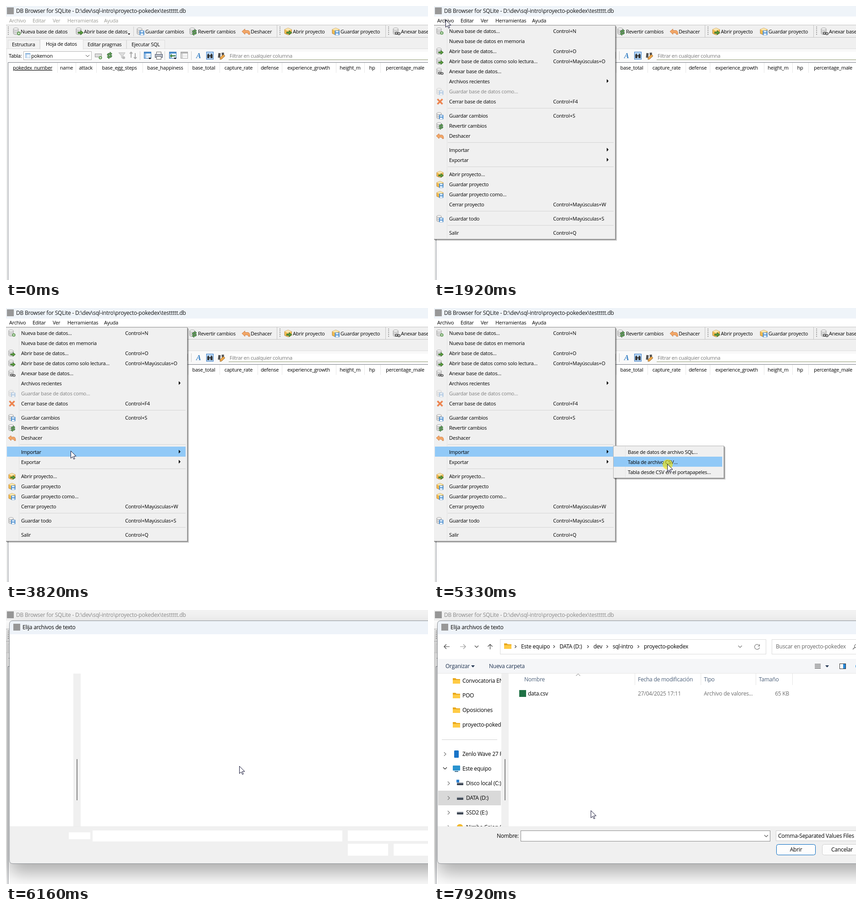
Animation of 921x599 px, one loop 7.99 s. Source, as an HTML page:

```html
<!DOCTYPE html>
<html lang="es">
<head>
<meta charset="utf-8">
<style>
html, body { margin: 0; width: 100%; height: 100%; overflow: hidden; background: #fff; }
svg { display: block; }
text { font: 11px "Open Sans", "Noto Sans", sans-serif; letter-spacing: -.25px; white-space: pre; }
.big text { font-size: 12px; letter-spacing: -.23px; }
.mid { text-anchor: middle; }
</style>
</head>
<body>
<svg id="stage" width="921" height="599" viewBox="0 0 921 599"></svg>
<script>
const LOOP = 7990, stage = document.getElementById('stage');

const rect = (x, y, w, h, fill, more = '') =>
  `<rect x="${x}" y="${y}" width="${w}" height="${h}" fill="${fill}" ${more}/>`;
const box = (x, y, w, h, fill, stroke, r = 0) =>
  rect(x + .5, y + .5, w - 1, h - 1, fill, `stroke="${stroke}" rx="${r}"`);
const line = (d, color, w = 1, more = '') =>
  `<path d="${d}" fill="none" stroke="${color}" stroke-width="${w}" ${more}/>`;
const shape = (d, fill, stroke = 'none') =>
  `<path d="${d}" fill="${fill}" stroke="${stroke}" stroke-width=".8"/>`;
// y is the visual middle of the capitals
const text = (x, y, s, fill = '#000', more = '') =>
  `<text x="${x}" y="${y + 4}" fill="${fill}" ${more}>${s}</text>`;
const group = (id, body, more = '') => `<g id="${id}" ${more}>${body}</g>`;

const bend = shape('M3 8Q2 3 9 3V.500l4.500 4L9 8.500V6Q5.500 6 5.500 8z', '#5c9c50', '#2c5c33');
const parts = {
  db: shape('M1 3v9a5 2.2 0 0 0 10 0V3', '#dedede', '#8c8c8c') +
    '<ellipse cx="6" cy="3" rx="5" ry="2.2" fill="#f8f8f8" stroke="#8c8c8c" stroke-width=".8"/>' +
    line('M1 7.5a5 2.2 0 0 0 10 0', '#a8a8a8', .8),
  plus: '<circle cx="12" cy="12" r="3.6" fill="#5d9a50"/>' + line('M10 12h4M12 10v4', '#fff', 1.2),
  go: shape('M5 9h5V6l5.500 4.500-5.500 4.500v-3H5z', '#5a9c3c', '#27591f'),
  disk: rect(6, 6, 9.500, 9.500, '#4c8fd0', 'rx="1"') + rect(8, 7, 5.500, 3, '#e8f2fc') + rect(8, 12, 5.500, 3, '#fff'),
  turn: bend + `<g transform="rotate(180 8 8)">${bend}</g>`,
  swap: `<g transform="translate(3.500 3) scale(.85)">${bend}<g transform="rotate(180 8 8)">${bend}</g></g>`,
  link: line('M5 11.500a2.500 2 0 1 1 5 0a2.500 2 0 1 1-5 0M10 12.500a2.500 2 0 1 1 5 0a2.500 2 0 1 1-5 0', '#444', 1.4),
  undo: shape('M0 8l6-5v3h6q4 0 4 8h-3q0-3-3-3H6v3z', '#f3a868', '#c8743a'),
  cube: shape('M8 1l7 3v8l-7 3-7-3V4z', '#f4bd50', '#a9762a') + shape('M1 4l7-3 7 3-7 3z', '#fde7b0') +
    line('M8 7v8', '#fbe0a0'),
  cross: line('M2.500 2.500l11 11M13.500 2.500l-11 11', '#ec8450', 3.6),
  sheet: rect(.5, .5, 15, 14, '#fff', 'stroke="#3877b8"') + rect(1, 1, 14, 3, '#4c8fd0') + rect(1, 4, 4, 10, '#9cc4ea') +
    line('M1 7.500h14M1 10.500h14', '#a9c9e8'),
  funnel: shape('M0 1h14L9 8v6L6 12V8z', '#ddd', '#aaa'),
  drop: shape('M10 13h6l-3 3.500z', '#111')
};
const icon = (names, x, y, scale = 1, more = '') =>
  `<g transform="translate(${x} ${y}) scale(${scale})" ${more}>${names.split(' ').map(n => parts[n]).join('')}</g>`;
const grip = x => line(`M${x} 45v20`, '#9a9a9a', 2, 'stroke-dasharray="2 2"');

function mainWindow() {
  const tools = [
    ['db plus', 15, 32, 'Nueva base de datos'], ['db go', 152, 170, 'Abrir base de datos'],
    ['db disk', 285, 304, 'Guardar cambios'], ['db swap', 400, 419, 'Revertir cambios'],
    ['undo', 515, 534, 'Deshacer'], ['cube go', 607, 626, 'Abrir proyecto'],
    ['cube disk', 711, 730, 'Guardar proyecto'], ['db link', 844, 862, 'Anexar base de datos']
  ];
  const tabs = [[4, 'Estructura', 13, 70], [168, 'Editar pragmas', 178, 95], [263, 'Ejecutar SQL', 274, 84]];
  const columns = [
    [132, 'name'], [174, 'attack'], [247.500, 'base_egg_steps'], [347.500, 'base_happiness'],
    [431.500, 'base_total'], [507.500, 'capture_rate'], [575.500, 'defense'], [660.500, 'experience_growth'],
    [751, 'height_m'], [799, 'hp'], [871, 'percentage_male']
  ];
  const menus = [[7, 'Archivo'], [58, 'Editar'], [102, 'Ver'], [134, 'Herramientas'], [214, 'Ayuda']];
  return rect(0, 0, 921, 599, '#f0f0f0') +
    group('titleBar', rect(0, 0, 921, 23, 'currentColor')) +
    rect(2, 3, 15, 15, '#989898') +
    group('title', text(22, 11, 'DB Browser for SQLite - D:\\dev\\sql-intro\\proyecto-pokedex\\testtttt.db', 'currentColor'), 'class="big"') +
    rect(0, 23, 921, 18, '#fff') +
    group('menuBar', menus.map(([x, s]) => text(x, 32, s, 'currentColor')).join('')) +
    line('M0 41.500H921M0 68.500H921M591.500 42V68M828.500 42V68', '#c4c4c4') + line('M278.500 45V66', '#ccc') +
    grip(5) + grip(598) + grip(835) +
    tools.map(([n, ix, x, s]) => icon(n, ix, 47, 1.08) + text(x, 56, s)).join('') + shape('M266 60h5l-2.500 3z', '#000') +
    rect(0, 93, 921, 506, '#f9f9f9') + rect(0, 93, 3, 506, '#f0f0f0') +
    tabs.map(([x, s, tx, w]) => box(x, 74, w, 20, '#f2f2f2', '#dcdcdc') + text(tx, 84, s)).join('') +
    line('M0 93.500H921', '#dcdcdc') + box(74, 72, 95, 23, '#f9f9f9', '#dcdcdc') + rect(75, 92, 93, 3, '#f9f9f9') +
    text(87, 83, 'Hoja de datos') +
    text(6, 109, 'Tabla:') + box(38, 99, 149, 19, '#fff', '#b5b5b5') +
    icon('sheet', 42, 103, .7, 'opacity=".7"') + text(55, 109, 'pokemon') +
    line('M174 107l4 4 4-4', '#444') +
    rect(194.500, 104.500, 14, 7, '#ddd', 'stroke="#999"') + icon('plus', 194, 101) +
    icon('turn', 218, 100) + icon('funnel', 246, 101) + '<circle cx="257" cy="113" r="3" fill="#bbb"/>' +
    line('M273 101v12M270 104l3-3 3 3M282 103v12M279 112l3 3 3-3', '#aaa', 2) +
    line('M292.500 99v19M346.500 99v19M404.500 99v19', '#ccc') + icon('sheet drop', 301, 100) +
    box(328, 100, 11, 7, '#fff', '#666') + box(325, 105, 17, 8, '#b8bdc8', '#50586a') + box(328, 110, 11, 7, '#fff', '#666') +
    icon('sheet drop', 356, 100) + line('M359 109h11M362 106l-3 3 3 3', '#4a8a40', 2) +
    icon('sheet', 381, 100, 1, 'style="filter:grayscale(1) opacity(.6)"') +
    '<text x="415" y="114" fill="#357fc4" style="font:italic bold 16px \'Liberation Serif\',serif">A</text>' +
    box(437, 100, 16, 17, '#b9d9f8', '#3a78c0') + line('M441.500 106v8M448.500 106v8', '#333', 4.5) + line('M441 109h7M441.500 104v3M448.500 104v3', '#333', 2) +
    line('M466 103l-1 10M473 102l1 10', '#555', 5) + shape('M467 113l7-7 4 3-7 7-4 1z', '#eda64a', '#8c6128') +
    rect(487, 100, 434, 18, '#fff') + line('M486 117.500H921', '#8f9a72') + text(488, 109, 'Filtrar en cualquier columna', '#777') +
    rect(5, 124, 916, 475, '#fff') + line('M4.500 599V123.500H921', '#777c84') +
    text(58, 135, 'pokedex_number', '#000', 'class="mid" text-decoration="underline"') +
    columns.map(([x, s]) => text(x, 135, s, '#000', 'class="mid"')).join('') +
    line([112, 152, 197, 298, 397, 466, 549, 602, 720, 782, 817].map(x => `M${x}.500 124v22`).join(''), '#e6e6e6');
}

const items = [
  ['db plus', 'Nueva base de datos…', 'Control+N'], ['', 'Nueva base de datos en memoria'],
  ['db go', 'Abrir base de datos…', 'Control+O'], ['db go', 'Abrir base de datos como solo lectura…', 'Control+Mayúsculas+O'],
  ['db link', 'Anexar base de datos…'], ['', 'Archivos recientes', '>'],
  ['db disk', 'Guardar base de datos como…', 'off'], ['cross', 'Cerrar base de datos', 'Control+F4'], 0,
  ['db disk', 'Guardar cambios', 'Control+S'], ['db swap', 'Revertir cambios'], ['undo', 'Deshacer'], 0,
  ['', 'Importar', '>'], ['', 'Exportar', '>'], 0,
  ['cube go', 'Abrir proyecto…'], ['cube disk', 'Guardar proyecto'], ['cube disk', 'Guardar proyecto como…'],
  ['', 'Cerrar proyecto', 'Control+Mayúsculas+W'], 0,
  ['db disk', 'Guardar todo', 'Control+Mayúsculas+S'], 0, ['', 'Salir', 'Control+Q']
];
const rows = [];
const panel = (x, y, w, h, column) =>
  rect(x + 3, y + 3, w, h, '#000', 'opacity=".22"') + rect(x + 1, y + 1, w, h, '#000', 'opacity=".4"') +
  box(x, y, w, h, '#f0f0f0', '#b4b4b4') + line(`M${column + .5} ${y + 2}v${h - 4}`, '#e4e4e4');

function fileMenu() {
  let y = 55, out = '';
  for (const item of items) {
    if (!item) {
      out += line(`M30 ${y - 7.500}H392`, '#d4d4d4');
      y += 9;
      continue;
    }
    const [ic, label, key] = item, off = key === 'off';
    rows.push(y);
    if (ic) out += icon(ic, 5, y - 8, 1, off ? 'opacity=".4"' : '');
    out += text(33, y, label, off ? '#808080' : '#000');
    if (key === '>') out += shape(`M377 ${y - 5}v8l4-4z`, '#000');
    else if (key && !off) out += text(260, y, key);
    y += 22;
  }
  return panel(-1, 42, 397, 468, 28) + rect(2, 0, 390, 22, '#91c9f7', 'id="rowBar"') + out;
}

const subMenu = () => panel(391, 301, 242, 71, 417) + rect(392, 0, 237, 22, '#91c9f7', 'id="subBar"') +
  ['Base de datos de archivo SQL…', 'Tabla de archivo CSV…', 'Tabla desde CSV en el portapapeles…']
    .map((s, i) => text(423, 315 + 22 * i, s)).join('');

const folder = (x, y) => shape(`M${x} ${y - 6}h6l2 2h8v10h-16z`, '#e9a81c') + rect(x, y - 2, 16, 8, '#ffcb45', 'rx="1"');
const drive = (x, y) => rect(x, y - 2, 14, 3, '#9aa0a8') + rect(x, y, 14, 4, '#3d4754', 'rx="1"');
const right = (x, y) => line(`M${x - 2} ${y - 4}l4 4-4 4`, '#777', 1.2);
const down = (x, y, c = '#444') => line(`M${x - 4} ${y - 2}l4 4 4-4`, c, 1.2);
const FRAME = 'M921 554.500H15Q7.500 554.500 7.500 547V31Q7.500 23.500 15 23.500H921';

const dialogShell = () =>
  rect(7, 23, 960, 532, '#f0f0f0', 'rx="8" style="filter:drop-shadow(0 21px 20px rgba(0,0,0,.32))"') +
  shape('M921 53H7V31Q7 23 15 23H921z', '#eef3f9') + rect(7, 53, 914, 420, '#fff') +
  rect(16, 30, 15, 15, '#989898') + text(36, 38, 'Elija archivos de texto') +
  rect(147, 139, 16, 334, '#f0f0f0') + rect(154, 326, 2, 90, '#858585') + line('M7 473.500H921', '#ececec') +
  line(FRAME, '#8d9196');

const blankFields = () => rect(137, 486, 47, 15, '#fff') + rect(189, 482, 545, 24, '#fff') +
  rect(746, 482, 175, 23, '#fff') + rect(746, 511, 88, 26, '#fff') + rect(846, 511, 75, 26, '#fff');

function dialogContent() {
  const head = '#4c607a', gray = '#6d6d6d';
  const crumbs = [[190, 'Este equipo'], [274, 'DATA (D:)'], [348, 'dev'], [390, 'sql-intro'], [458, 'proyecto-pokedex']];
  const folders = ['Convocatoria EN', 'POO', 'Oposiciones', 'proyecto-pokedex'];
  const side = folders.map((s, i) => folder(41, 155 + 32 * i) + text(62, 155 + 32 * i, s)).join('') +
    line('M17 283.500H138', '#d0d0d0') +
    right(24, 315) + rect(44, 307, 10, 16, '#1874c8', 'rx="1.500"') + text(62, 315, 'Zenlo Wave 27 F') +
    down(24, 346, '#222') + rect(41, 340, 16, 11, '#2a93cf', 'rx="1"') + rect(45, 352, 8, 2, '#3c6f90') + text(62, 347, 'Este equipo') +
    rect(9, 395, 137, 32, '#d9d9d9') +
    right(32, 379) + drive(50, 379) + rect(49, 371, 6, 6, '#2a7fd0') + text(70, 379, 'Disco local (C:)') +
    right(32, 411) + drive(50, 411) + text(70, 411, 'DATA (D:)') +
    right(32, 443) + drive(50, 443) + text(70, 443, 'SSD2 (E:)') +
    right(32, 475) + '<circle cx="56.500" cy="475" r="7" fill="#f2b92e"/>' + text(70, 475, 'Nimbo Cajon (G:)');
  return line('M34 80H22M27 75l-5 5 5 5', '#444', 1.2) + line('M57 80h12M64 75l5 5-5 5', '#999', 1.2) + down(93, 80) +
    line('M122.500 86V75M117.500 80l5-5 5 5', '#444', 1.2) +
    box(144, 64, 581, 33, '#fff', '#dadada') + box(737, 64, 200, 33, '#fff', '#dadada') + folder(153, 79) +
    [178, 262, 336, 378, 446].map(x => line(`M${x - 1.500} 77l3 3-3 3`, '#444', 1.2)).join('') +
    crumbs.map(([x, s]) => text(x, 80, s)).join('') + down(668, 80, '#777') +
    line('M710 78a5.500 5.500 0 1 0 .5 4M710.500 75v4h-4', '#777', 1.1) +
    text(746, 80, 'Buscar en proyecto-pokedex', '#666') + line('M914 86l5-5', '#555', 1.3) + '<circle cx="921" cy="79" r="3.500" fill="none" stroke="#555"/>' +
    rect(8, 107, 913, 31, '#f5f6f8') + line('M8 138.500H921', '#e6e6e6') +
    text(25, 123, 'Organizar', '#1e3250') + shape('M81 121h8l-4 4.500z', '#1e3250') + text(120, 123, 'Nueva carpeta', '#1e3250') +
    line('M831 118.500h13M831 121.500h13M831 124.500h13M831 127.500h13', '#333') + shape('M854 121h8l-4 4.500z', '#1e3250') +
    box(885, 117, 14, 12, '#fff', '#333') + rect(893, 118, 5, 10, '#2686d6') + '<circle cx="926" cy="123" r="6" fill="#1b8adf"/>' +
    line('M310 144l4.500-4.500 4.500 4.500', '#777') + line('M438.500 139v25M582.500 139v25M702.500 139v25M782.500 139v25', '#e4e4e4') +
    [[197, 'Nombre'], [445, 'Fecha de modificación'], [589, 'Tipo'], [709, 'Tamaño']].map(([x, s]) => text(x, 152, s, head)).join('') +
    rect(186, 175, 15, 15, '#1f7145') + text(205, 183, 'data.csv') + text(445, 183, '27/04/2025 17:11', gray) +
    text(589, 183, 'Archivo de valores...', gray) + text(775, 183, '65 KB', gray, 'text-anchor="end"') +
    `<svg x="0" y="139" width="146.500" height="334" viewBox="0 139 146.500 334">${side}</svg>` +
    text(137, 494, 'Nombre:') + box(189, 482, 545, 24, '#fff', '#8a8a8a') + down(725, 494, '#555') +
    box(746, 482, 200, 23, '#fff', '#d0d0d0') + text(751, 494, 'Comma-Separated Values Files') +
    box(747, 512, 86, 24, '#fdfdfd', '#0067c0', 4) + text(790, 524, 'Abrir', '#000', 'class="mid"') +
    box(847, 512, 90, 24, '#fdfdfd', '#d0d0d0', 4) + text(867, 524, 'Cancelar');
}

stage.innerHTML = mainWindow() + group('menu', fileMenu()) + group('sub', subMenu()) +
  group('dialog', dialogShell() + group('blank', blankFields()) + group('content', dialogContent()), 'class="big"') +
  '<circle id="halo" cx="510" cy="342" r="11" fill="#f2e600" opacity=".6"/>' +
  group('cursor', '<path d="M.5 .5V16.500L4.300 13 6.900 18.500 9.200 17.500 6.700 12H12Z" fill="#fff" stroke="#111133"/>');

const el = id => document.getElementById(id);
const show = (id, on) => { el(id).style.display = on ? '' : 'none'; };

// pointer way points: time, x, y
const path = [
  [200, 556, 604], [540, 510, 500], [680, 510, 500], [1100, 230, 190], [1500, 10, 12], [1700, 25, 30],
  [2270, 25, 30], [2590, 43, 42], [2740, 43, 42], [3070, 125, 133], [3350, 135, 203], [3500, 135, 203],
  [3750, 141, 312], [3900, 141, 312], [4290, 193, 314], [4480, 398, 317], [4850, 509, 341],
  [6500, 509, 341], [6820, 765, 400], [7150, 183, 482], [7310, 356, 441], [7450, 342, 438], [LOOP, 342, 438]
];
function pointer(t) {
  const i = Math.max(1, path.findIndex(p => p[0] >= t));
  const [t0, x0, y0] = path[i - 1], [t1, x1, y1] = path[i];
  const k = Math.max(0, (t - t0) / (t1 - t0));
  return [x0 + (x1 - x0) * k, y0 + (y1 - y0) * k];
}

function setBar(id, y) {
  show(id, y !== undefined);
  if (y !== undefined) el(id).setAttribute('y', y - 12);
}

function draw(t) {
  const [x, y] = pointer(t), [hx, hy] = pointer(t - 60);
  const menuOpen = t >= 1780 && t < 5400, subOpen = t >= 4150 && t < 5400;
  const inSub = subOpen && hx > 392, inactive = t >= 5540;
  el('titleBar').style.color = inactive ? '#f3f3f3' : '#eff4f9';
  el('title').style.color = inactive ? '#8b8b8b' : '#111';
  el('menuBar').style.color = t < 70 ? '#9a9a94' : '#000';
  show('menu', menuOpen);
  show('sub', subOpen);
  if (menuOpen) setBar('rowBar', inSub ? 315 : rows.find(r => Math.abs(hy - r) <= 11));
  if (subOpen) setBar('subBar', inSub ? [315, 337, 359].find(r => Math.abs(hy - r) <= 11) : undefined);
  const open = Math.min(1, (t - 5920) / 170);
  show('dialog', t >= 5950);
  if (t >= 5950) {
    const s = .94 + .06 * open;
    el('dialog').style.opacity = open;
    el('dialog').setAttribute('transform', open < 1 ? `translate(477 289) scale(${s}) translate(-477 -289)` : '');
  }
  show('blank', t < 6220);
  show('content', t >= 6220);
  show('halo', t >= 5200 && t < 5400);
  show('cursor', t >= 270);
  el('cursor').setAttribute('transform', `translate(${Math.round(x)} ${Math.round(y)})`);
}

function tick() {
  draw(performance.now() % LOOP);
  requestAnimationFrame(tick);
}
tick();
</script>
</body>
</html>
```
